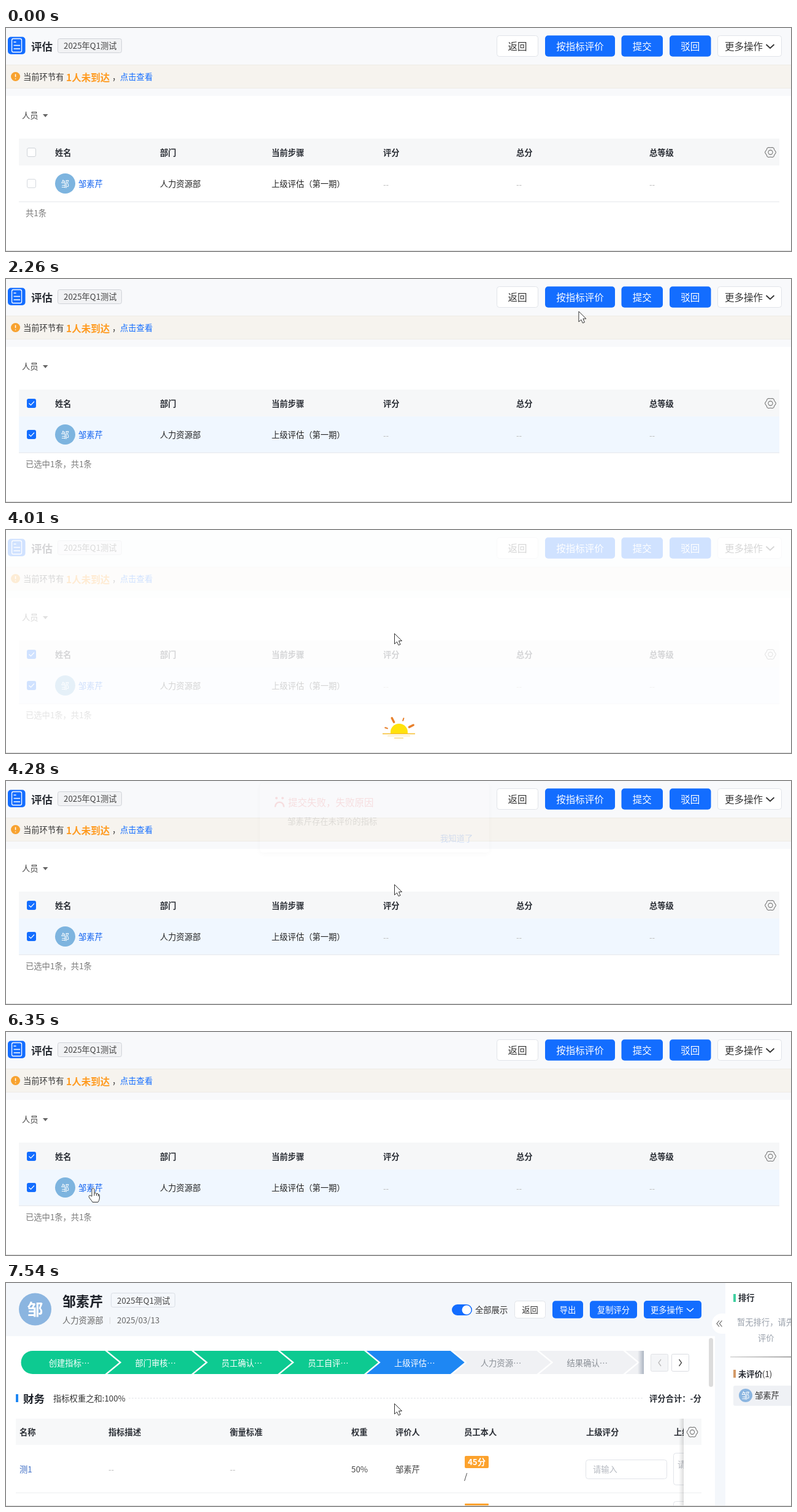
Write an HTML page that moves like this. It is 1280 px wide and 365 px high and loops after 7740 ms.

```html
<!DOCTYPE html>
<html lang="zh-CN">
<head>
<meta charset="utf-8">
<title>评估</title>
<style>
html, body { margin: 0; width: 100%; height: 100%; overflow: hidden; background: #fff; }
svg { display: block; width: 1280px; height: 365px; font-family: "Noto Sans CJK SC", "Noto Sans CJK", sans-serif; }
.card { filter: drop-shadow(0 2px 5px #0003); }
</style>
</head>
<body>
<svg id="stage" viewBox="0 0 1280 365"></svg>
<script>
const LOOP = 7740, BLUE = '#136dff', LIGHT = '#4791ff', PERSON = '邹素芹';
const $ = id => document.getElementById(id);

// Markup helpers; text is placed by its vertical centre.
const text = (x, y, size, str, fill = '#333', more = '') =>
  `<text x="${x}" y="${y + size * .38}" font-size="${size}" fill="${fill}" ${more}>${str}</text>`;
const small = (x, y, str, fill, more) => text(x, y, 13.3, str, fill, more);
const bold = (x, y, str, fill = '#2b2f36', size = 13.3) => text(x, y, size, str, fill, 'font-weight="700"');
const mid = (x, y, size, str, fill, more = '') => text(x, y, size, str, fill, 'text-anchor="middle" ' + more);
const rect = (x, y, w, h, fill, r = 0, more = '') =>
  `<rect x="${x}" y="${y}" width="${w}" height="${h}" rx="${r}" fill="${fill}" ${more}/>`;
const box = (x, y, w, h, fill = '#fff', edge = '#e1e4e9', r = 4) =>
  rect(x + .5, y + .5, w - 1, h - 1, fill, r, `stroke="${edge}"`);
const disc = (x, y, r, fill, more = '') => `<circle cx="${x}" cy="${y}" r="${r}" fill="${fill}" ${more}/>`;
const line = (d, color, w = 1, more = '') => `<path d="${d}" fill="none" stroke="${color}" stroke-width="${w}" ${more}/>`;
const group = (id, body, more = '') => `<g id="${id}" ${more}>${body}</g>`;
const button = (x, y, w, h, str, size, id = '') =>
  rect(x, y + .3, w, h - .6, BLUE, 5, id && `id="${id}"`) + mid(x + w / 2, y + h / 2 + .8, size, str, '#fff');
const plain = (x, y, w, h, str, size) => box(x, y, w, h) + mid(x + w / 2, y + h / 2 + .8, size, str, '#333');
const warn = (x, y, r, fill) => disc(x, y, r, fill) +
  line(`M${x} ${y - r * .55}v${r * .65}m0 ${r * .3}v${r * .18}`, '#fff', r * .2);
const gear = (x, y) => {
  const points = [...Array(48)].map((_, i) => {
    const a = i * Math.PI / 24, r = 8.2 + .6 * Math.cos(6 * a);
    return [x + r * Math.cos(a), y + r * Math.sin(a)].map(v => v.toFixed(2));
  });
  return line(`M${points.join('L')}Z`, '#777', 1.1) + disc(x, y, 3.6, 'none', 'stroke="#777" stroke-width="1.1"');
};
const avatar = (x, y, r, size, fill, more) => disc(x, y, r, fill) + mid(x, y, size, PERSON[0], '#fff', more);
const tick = y => rect(34, y, 15, 15, BLUE, 3) + line(`M37.5 ${y + 7.5}l3 3 5.5-6`, '#fff', 1.2);

function listPage() {
  const heads = { 姓名: 80, 部门: 251, 当前步骤: 433, 评分: 615, 总分: 832, 总等级: 1049 };
  return rect(0, 0, 1280, 111, '#f8f9fb') +
    rect(3, 14.5, 28.5, 28.5, BLUE, 5) +
    rect(9.5, 17.5, 16, 22, 'none', 2.5, 'stroke="#fff" stroke-width="1.3"') +
    line('M12.500 23h4m-4 5.500h10.500m-10.500 5.500h10.500', '#fff', 1.4) +
    bold(41, 30.5, '评估', '#2b2f36', 17.5) +
    box(84, 17, 105, 24, '#f1f2f4', '#d0d3d8', 3) + small(94, 29.2, '2025年Q1测试', '#444') +
    plain(800, 12, 68, 35, '返回', 15.5) +
    button(879, 12, 114, 35, '按指标评价', 15.5) +
    button(1003.5, 12, 67.5, 35, '提交', 15.5, 'submit') +
    button(1082, 12, 67.5, 35, '驳回', 15.5) +
    box(1160, 12, 105, 35) + text(1172, 30.5, 15.5, '更多操作') + line('M1239.500 27l6.500 6 6.500-6', '#333', 1.8) +
    rect(0, 60, 1280, 38, '#f6f3ee') + line('M0 60.500H1280M0 98.500H1280', '#eeebe6') +
    warn(15.5, 79.5, 7.5, '#f8a22f') + small(28, 80, '当前环节有') +
    bold(98, 81, '1人未到达', '#ff9a1f', 15.5) + small(173, 80, '，') + small(186, 80, '点击查看', BLUE) +
    small(26, 143, '人员', '#444') + '<path d="M60 141h8.500l-4.250 5Z" fill="#666"/>' +
    rect(21, 181, 1240, 44, '#f6f7f8') +
    Object.entries(heads).map(([s, x]) => bold(x, 203.5, s)).join('') + gear(1246.5, 203.5) +
    rect(21, 225, 1240, 59, '#f0f7ff', 0, 'id="hover"') + line('M21 284.500H1261', '#e6e8eb') +
    box(34, 196, 15, 15, '#fff', '#cfd3d8', 2.5) + box(34, 247, 15, 15, '#fff', '#d5d9de', 2.5) +
    group('checks', tick(196) + tick(247)) +
    avatar(96.5, 254.5, 16.5, 13.3, '#7db4df') + small(118, 254.7, PERSON, '#1263f0') +
    small(251, 255.2, '人力资源部', '#222') + small(433, 255.2, '上级评估（第一期）', '#222') +
    [615, 832, 1049].map(x => small(x, 256, '--', '#bbb')).join('') +
    small(32, 303, '', '#777', 'id="count"');
}

const popup = () => group('popup',
  group('', rect(850, 60, 374, 105, '#fff', 5) + '<path d="M1031 61l8-8 8 8Z" fill="#fff"/>', 'class="card"') +
  warn(876.5, 87.5, 10, '#ff9800') + bold(891, 88, '确定要提交选中的数据?', '#222', 15.5) +
  plain(1084, 119, 57, 28, '取消', 13.3) + button(1149, 119, 57, 28, '确定', 13.3, 'confirm'));

const sun = () => group('sun',
  group('rays', [...Array(8)].map((_, i) => line(i % 2 ? 'M20 0h4' : 'M18.500 0h7.500', '#e8802c', i % 2 ? 2 : 3.5,
    `stroke-linecap="round" transform="rotate(${i * 45})"`)).join('')) +
  disc(0, 0, 14, '#ffe20c'), 'transform="translate(641 331)"');

const loading = () => group('loading',
  rect(0, 0, 1280, 364, '#fff', 0, 'opacity=".8"') +
  `<g clip-path="url(#sky)">${sun()}</g>` +
  line('M614 333.500h53', '#f6bd2b', 1.6) + line('M622 337h37', '#fae19a') + line('M633 340.500h15', '#f6c94f'));

const dialog = () => group('dialog',
  rect(414, 21, 374, 113, '#fff', 5, 'class="card"') +
  disc(441, 45, 2, '#f0484a') + disc(451, 45, 2, '#f0484a') +
  line('M439 58.500c1-9 13-9 14 0', '#f0484a', 2.6, 'stroke-linecap="round"') +
  text(460, 52, 15.5, '提交失败，失败原因', '#f0484a') +
  small(459, 82.5, PERSON + '存在未评价的指标', '#555') + small(708, 111.2, '我知道了', '#1263f0'));

function steps() {
  const names = ['创建指标', '部门审核', '员工确认', '员工自评', '上级评估', '人力资源', '结果确认', ''];
  return names.map((s, i) => {
    const x = 24.5 + i * 140.8, fill = i < 4 ? '#0dca91' : i == 4 ? '#1e87f3' : '#f0f1f4';
    const shape = i ? `M${x} 111h137l23 19-23 19h-137l23-19Z` : `M${x + 19} 111h118l23 19-23 19h-118a19 19 0 0 1 0-38Z`;
    return `<path d="${shape}" fill="${fill}"/>` +
      (s && mid(x + 78.5, 130.5, 13.3, s + '…', i < 5 ? '#fff' : '#8a8f96'));
  }).join('');
}

function detailPage() {
  const heads = { 名称: 22, 指标描述: 167, 衡量标准: 365, 权重: 563, 评价人: 635, 员工本人: 747, 上级评分: 946, 上级: 1089 };
  return group('detail', rect(0, 0, 1280, 364, '#f4f7fb') + rect(0, 87, 1156, 277, '#fff') +
    avatar(47.5, 43, 26.5, 26, '#8bb5e0', 'font-weight="700"') + bold(92, 29.5, PERSON, '#1c2028', 22) +
    box(171, 16, 105, 24, '#f4f7fb', '#d9dee5', 3) + small(181, 28.5, '2025年Q1测试', '#444') +
    small(92, 61, '人力资源部', '#666') + line('M169.500 56v11', '#ddd') + small(181, 61, '2025/03/13', '#666') +
    group('actions', rect(727, 35, 33, 18, BLUE, 9) + disc(751, 44, 7.5, '#fff') + small(765, 44, '全部展示') +
      plain(829, 29, 51, 29, '返回', 13.3) + button(891, 29, 50, 29, '导出', 13.3) +
      button(952, 29, 77, 29, '复制评分', 13.3) + rect(1040, 29, 94, 29, BLUE, 5) +
      small(1051, 44, '更多操作', '#fff') + line('M1110 41.500l5.500 5 5.500-5', '#fff', 1.5)) +
    `<g clip-path="url(#track)">${steps()}</g>` + rect(1030, 111, 10, 38, 'url(#edge)') +
    box(1051, 116, 29, 29, '#f4f5f7', '#e0e2e6', 2) + box(1085, 116, 29, 29, '#fff', '#d9dce1', 2) +
    group('arrows', line('M1068 125l-4 5.500 4 5.500', '#bbb', 1.3) + line('M1097.500 125l4 5.500-4 5.500', '#444', 1.3)) +
    rect(1146, 90, 7, 80, '#dcdcdc', 3.5, 'id="thumb"') +
    rect(16, 182, 4, 13, '#1e87f3') + bold(28, 189, '财务', '#1c2028', 17.5) + small(77, 189, '指标权重之和:100%') +
    line('M200 188.500H1040', '#e2e4e8', 1, 'stroke-dasharray="3 2"') + bold(1049, 189, '评分合计：-分') +
    rect(16, 222, 1118, 43, '#f7f8f9') + line('M16 343.500H1134', '#eceef0') +
    Object.entries(heads).map(([s, x]) => bold(x, 244, s)).join('') +
    small(22, 305, '测1', '#3a6bc4') + small(167, 305, '--', '#bbb') + small(365, 305, '--', '#bbb') +
    small(563, 304.5, '50%', '#444') + small(635, 304.5, PERSON, '#444') +
    rect(748, 283, 39, 20, '#fca22d', 2) + bold(753, 293, '45分', '#fff') + small(747, 317, '/') +
    rect(748, 361, 39, 3, '#fca22d', 1) +
    box(945, 289, 133, 32) + small(957, 305, '请输入', '#b5b9c0') +
    box(1088, 278, 40, 53) + small(1095, 297, '请', '#b5b9c0') + box(1088, 357, 40, 53) +
    rect(1097, 222, 8, 142, 'url(#fade)') + rect(1105, 222, 29, 43, '#f7f8f9') + rect(1105, 265, 29, 99, '#fff') +
    line('M1105 343.500h29', '#eceef0') + gear(1119, 244) +
    rect(1173, 0, 107, 364, '#fff') + '<path d="M1173 50h-6a16 16.500 0 0 0 0 33h6Z" fill="#fff"/>' +
    line('M1163 61.500l-4 5 4 5m4.500-10l-4 5 4 5', '#666', 1.2) +
    rect(1186, 18, 4, 13, '#41cfa0') + bold(1194, 24, '排行') +
    small(1192, 63.5, '暂无排行，请先', '#99a0ab') + small(1226, 90, '评价', '#99a0ab') +
    rect(1181, 120, 99, 2, 'url(#rule)') +
    rect(1186, 142, 4, 13, '#d39a68') + bold(1194, 148.5, '未评价') + small(1233, 148.5, '(1)') +
    rect(1186, 168, 104, 33, '#eff1f5', 3) + avatar(1206, 184, 11, 13.3, '#8bb5e0') + small(1221, 184, PERSON));
}

const gradient = (id, a, b) =>
  `<linearGradient id="${id}"><stop stop-color="${a}"/><stop offset="1" stop-color="${b}"/></linearGradient>`;

$('stage').innerHTML = '<defs>' + gradient('edge', '#8a97a800', '#8a97a8aa') + gradient('fade', '#0000', '#0002') +
  gradient('rule', '#ddd', '#aaa') +
  `<clipPath id="sky">${rect(600, 290, 80, 43, '#000')}</clipPath>` +
  `<clipPath id="track">${rect(0, 100, 1040, 60, '#000')}</clipPath></defs>` +
  listPage() + popup() + loading() + dialog() + detailPage() +
  rect(0, 364, 1280, 1, '#dcdcdc') +
  disc(0, 0, 13, '#fcf800', 'id="halo"') +
  group('cursor', '<path id="arrow" d="M.5.5v17l4-3.500 2.500 5.500 3-1.200-2.500-5.800h5Z"/>' +
    '<path id="hand" d="M-2 14V2Q0-1 2 2V9Q4 7 5.500 9.500 7.500 8 8.500 11 10.500 10 10.500 13V17Q10 21 8 23.500H-1Q-2 21-5 18-8 14-6 12.500-4.500 12-2 14ZM2 9v4m3.500-3v3m3-2v3"/>',
    'fill="#fff" stroke="#333" stroke-linejoin="round"');

// Pointer moves: first step, last step, number of steps, end point, ends as hand
const moves = [
  [190, 930, 12, 49, 243, 0],
  [990, 1240, 5, 41, 247, 1],
  [1760, 2330, 10, 1037, 30, 1],
  [2520, 2920, 7, 1200, 122, 1],
  [2990, 3120, 3, 1202, 130, 1],
  [3390, 3940, 9, 633, 169, 0],
  [4890, 5100, 4, 742, 111, 1],
  [5435, 5700, 5, 52, 238, 0],
  [5770, 5890, 3, 142, 255, 1],
  [6680, 7080, 7, 633, 197, 0],
];
const clicks = [[1440, 1700], [2395, 2520], [3190, 3390], [5370, 5435], [6480, 6680]];

const within = (t, a, b) => t >= a && t < b;
const ramp = (t, a, b) => Math.min(1, Math.max(0, (t - a) / (b - a)));
const ease = p => p * p * (3 - 2 * p);
const show = (id, on) => $(id).setAttribute('opacity', +on);

function pointer(t) {
  let x = 842, y = 157, hand = false;
  for (const [a, b, n, ex, ey, isHand] of moves) {
    if (t < a) break;
    const p = ease(Math.min(n, 1 + Math.floor((t - a) / (b - a) * (n - 1) + 1e-6)) / n);
    x += (ex - x) * p;
    y += (ey - y) * p;
    hand = isHand && Math.hypot(ex - x, ey - y) < 20;
  }
  return { x, y, hand };
}

function draw(t) {
  const { x, y, hand } = pointer(t), selected = t >= 1700;
  $('cursor').setAttribute('transform', `translate(${x} ${y})`);
  show('cursor', t >= 190);
  show('hand', hand);
  show('arrow', !hand);
  $('halo').setAttribute('cx', x);
  $('halo').setAttribute('cy', y);
  show('halo', clicks.some(([a, b]) => within(t, a, b)) * .52);

  show('hover', selected || y > 225);
  show('checks', selected);
  $('count').textContent = selected ? '已选中1条，共1条' : '共1条';
  $('submit').setAttribute('fill', hand && y < 47 ? LIGHT : BLUE);
  $('confirm').setAttribute('fill', hand && x > 1149 ? LIGHT : BLUE);

  show('popup', ramp(t, 2430, 2590) * (1 - ramp(t, 3390, 3530)));
  show('loading', ramp(t, 3450, 3600) * (1 - ramp(t, 4080, 4150)));
  $('rays').setAttribute('transform', `rotate(${-27 + (t - 4010) * .06})`);

  const open = ease(ramp(t, 4190, 4560)), close = ramp(t, 5435, 5680);
  show('dialog', open * (1 - close));
  $('dialog').setAttribute('transform', `translate(0 ${-20 * (1 - open) - 10 * close})`);

  show('detail', ramp(t, 6660, 6820));
  show('arrows', t >= 7150);
  $('thumb').setAttribute('height', t < 7150 ? 36 : 80);
  show('actions', t >= 7540);
}

const start = performance.now();
function frame() {
  draw((performance.now() - start) % LOOP);
  requestAnimationFrame(frame);
}
frame();
</script>
</body>
</html>
```
